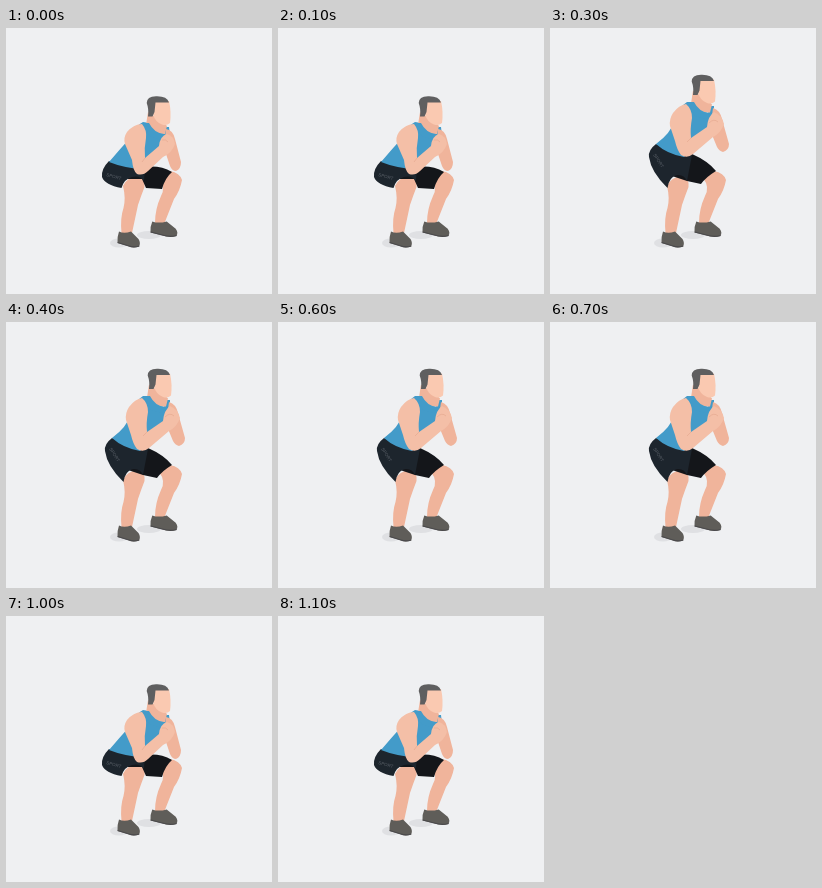
Recreate the animation shown at these times as an HTML page. Size 266x266 px, loop 1.2 s.

```html
<!DOCTYPE html>
<html lang="en">
<head>
<meta charset="utf-8">
<title>Squat</title>
<style>
  html, body { margin: 0; width: 100%; height: 100%; overflow: hidden; background: #eff0f2; }
  svg { display: block; width: 100vw; height: 100vh; }
  .skin { fill: #fac9b1; }
  .arm { fill: #f4bfa7; }
  .shade { fill: #f0b49b; }
  .top { fill: #439bc9; }
  .shorts { fill: #14161a; }
  .thigh { fill: #1d252d; }
  .hair { fill: #5f5f60; }
  .shoe { fill: #5f5d59; }
  .sole { fill: none; stroke: #4b4a4c; stroke-width: 1.2; }
  .fold { fill: none; stroke: #e5aa91; stroke-width: .7; }
  text { font: 4.5px "Liberation Sans", sans-serif; fill: #5a6068; }
</style>
</head>
<body>
<svg viewBox="0 0 266 266">
  <defs>
    <g id="head">
      <path class="shade" d="M142 84L140 97Q149 107 159 106L161 98L157 94Z"/>
      <path class="skin" d="M147 74L163 73Q165.5 84 164 95Q161 98 156 96.5Q149 94 147 86Z"/>
      <path class="hair" d="M140.7 75Q140.7 68.5 150 68.2Q161 67.8 163 74.5L149.5 74.5L148.5 84L146.5 88.5L142 88.5Q143 81 140.7 75Z"/>
    </g>
    <g id="shoe">
      <path class="shoe" d="M113 203.5Q118 206 125 203.5L132.5 211Q135 215 133 218.5Q126 220.5 122 218L111.5 215Q111 209 113 203.5Z"/>
      <path class="sole" d="M111.7 214.5L122 217.8Q128 220 133.3 218"/>
    </g>
  </defs>

  <g fill="#dfe0e3">
    <ellipse cx="113" cy="215" rx="9" ry="4.5"/>
    <ellipse cx="143" cy="207" rx="12" ry="4"/>
  </g>
  <path class="shade" d="M153 150L164 143Q174 145 176 152Q174 163 168 171L158.5 195L149 195Q149 181 155 168Q160 159 153 150Z"/>
  <use href="#shoe" transform="translate(10.7 -4) scale(1.2 .97)"/>
  <path class="shade" d="M117 158Q121 149 132 148Q140 151 138.5 159Q135 168 132 177L126 205L115.5 205Q114 190 117.5 180Q120 170 117 158Z"/>
  <use href="#shoe"/>

  <g id="low">
    <path class="shorts" d="M122 142L139 139Q154 137 166 144Q159 150 156 161L140 160L136 151L122 151Z"/>
    <path class="thigh" d="M103 133Q95 141 96 149Q99 157 115.5 160Q118 151 126 149Q134 147 138 153L139 138Z"/>
    <path class="top" d="M137 94Q129 98 125 109Q114 121 103 134Q118 140 136 141L147 129L164 108L163 99L160 99L157 106Q147 106 143 95Z"/>
    <path class="shade" d="M160 101Q167 102 169 111L175 134Q175 141 170 143Q166 143 164 138L158 120Z"/>
    <use href="#head"/>
    <path class="top" d="M136 95L143 95Q148 105 158 106L156 112L144 108Z"/>
    <path class="arm" d="M136 96Q141 102 140 110Q138 120 139 130L153 118Q154 108 161 106Q168 108 169 116Q166 125 157 129L142 143Q137 148 131 146Q127 143 126 132L119 116Q117 110 121 104Q128 96 136 96Z"/>
    <path class="fold" d="M139 130L136 134M156 112Q160 111 162 114"/>
    <text transform="translate(100 148) rotate(15)">SPORT</text>
  </g>

  <g id="high">
    <path class="shorts" d="M122 127L142 126Q158 133 166 143Q156 149 151 156L137 153L122 148Z"/>
    <path class="thigh" d="M106 116Q98 122 99 129Q101 144 117.5 160Q119 149 127 147Q134 146 137 153L142 127Z"/>
    <path class="top" d="M137 74Q130 78 125 92Q121 105 106 116Q117 126 134 129L146 118L164 89L164 78L161 78L158 85Q148 85 144 74Z"/>
    <path class="shade" d="M163 80Q170 82 172 91L179 116Q179 122 173 124Q169 123 167 119L160 102Z"/>
    <use href="#head" transform="translate(1 -21.5)"/>
    <path class="top" d="M137 74L144 74Q149 84 159 85L157 91L145 88Z"/>
    <path class="arm" d="M136 76Q142 81 142 90Q140 101 141 110L157 99Q158 88 164 84Q172 87 174 96Q171 105 163 109L143 126Q137 131 131 127Q127 122 125 113L120 98Q119 91 123 85Q129 77 136 76Z"/>
    <path class="fold" d="M141 110L137 114M159 95Q164 90 168 94"/>
    <text transform="translate(103 127) rotate(57)">SPORT</text>
  </g>
</svg>
<script>
  const low = document.getElementById("low");
  const high = document.getElementById("high");

  // The body snaps between two poses; feet and lower legs stay put.
  function draw(now) {
    const t = now % 1200;
    const raised = t >= 300 && t < 800;
    low.style.display = raised ? "none" : "";
    high.style.display = raised ? "" : "none";
    requestAnimationFrame(draw);
  }
  draw(performance.now());
</script>
</body>
</html>
```
